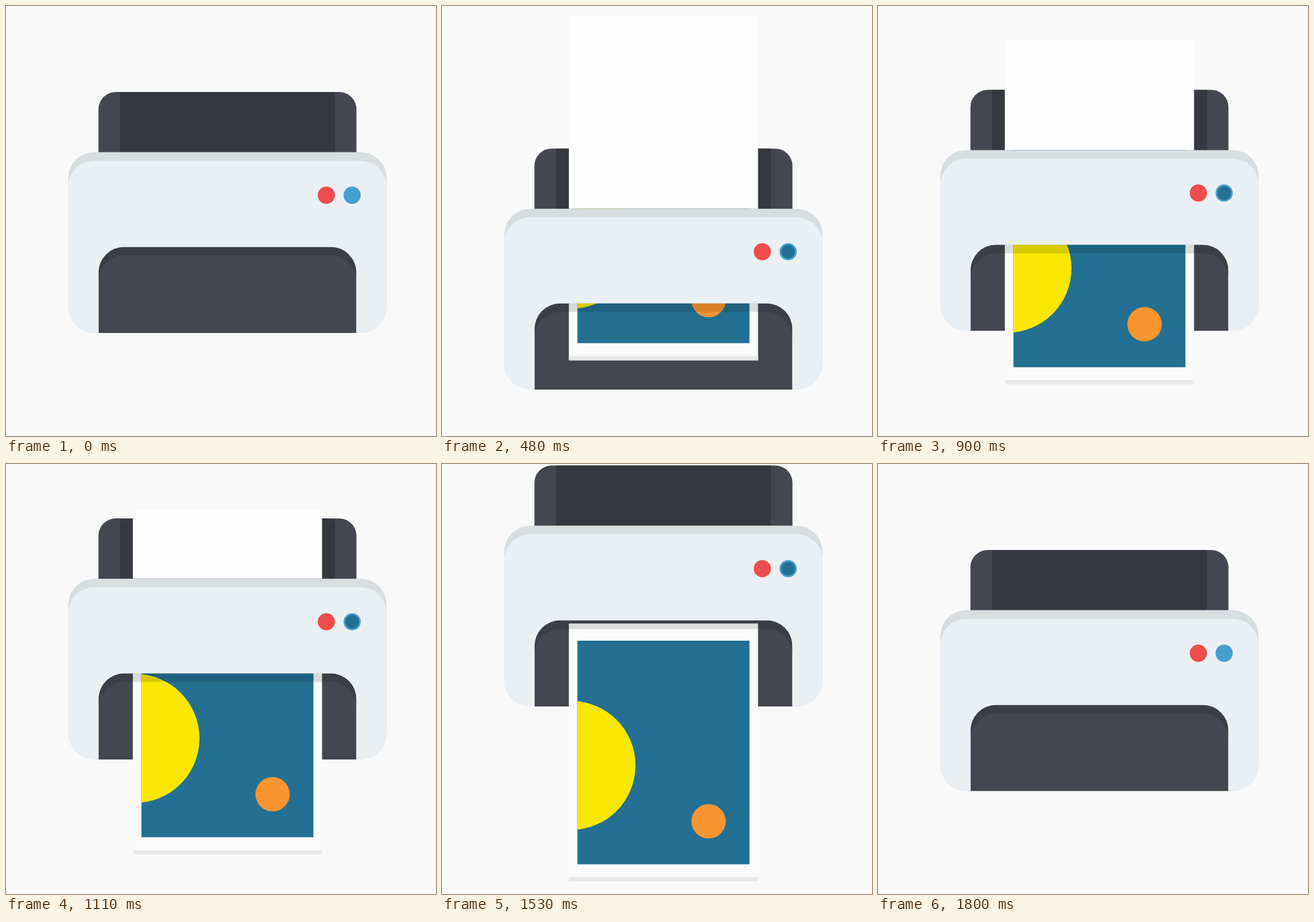
Recreate the animation shown at these times as an HTML page with a canvas. Size 640 by 640 pixels, loop 1.83 s.

```html
<!DOCTYPE html>
<html>
<head>
<meta charset="utf-8">
<title>Printer</title>
<style>
html, body { margin: 0; width: 100%; height: 100%; overflow: hidden; background: #f9f9f9; }
canvas { display: block; }
</style>
</head>
<body>
<canvas id="stage" width="640" height="640"></canvas>
<script>
const ctx = document.getElementById('stage').getContext('2d');
const UNIT = 12.8, LOOP = 1830, STEP = 30;

// cubic-bezier(.42, 0, 1, 1), solved by bisection
function easeIn(x) {
  let lo = 0, hi = 1;
  for (let i = 0; i < 24; i++) {
    const s = (lo + hi) / 2;
    if (1.26 * s * (1 - s) ** 2 + 3 * s * s - 2 * s ** 3 < x) lo = s; else hi = s;
  }
  return 3 * lo * lo - 2 * lo ** 3;
}
const easeOut = x => 1 - easeIn(1 - x);
const mix = (a, b, k) => a + (b - a) * k;

// Enter with ease-out, print at a steady pace, leave with ease-in
function track(t, start, enter, leave, end) {
  if (t < 300) return mix(start, enter, easeOut(t / 300));
  if (t < 1500) return mix(enter, leave, (t - 300) / 1200);
  return mix(leave, end, easeIn(Math.min(1, (t - 1500) / 300)));
}

function box(color, x, y, w, h) {
  ctx.fillStyle = color;
  ctx.fillRect(x, y, w, h);
}

function disc(color, x, y, r) {
  ctx.fillStyle = color;
  ctx.beginPath();
  ctx.arc(x, y, r, 0, 7);
  ctx.fill();
}

function clipped(x, y, w, h, draw) {
  ctx.save();
  ctx.beginPath();
  ctx.rect(x, y, w, h);
  ctx.clip();
  draw();
  ctx.restore();
}

function rounded(color, ...shapes) {
  ctx.fillStyle = color;
  ctx.beginPath();
  for (const s of shapes) ctx.roundRect(...s);
  ctx.fill('evenodd');
}

function print(bottom) {
  const top = bottom - 28;
  box('#fafafa', 14.75, top - 2, 22, 30);
  box('#e9e9e9', 14.75, bottom - 0.5, 22, 0.5);
  box('#237092', 15.75, top, 20, 26);
  clipped(15.75, top, 20, 26, () => disc('#f9e700', 15, top + 14.5, 7.5));
  disc('#fa942f', 31, top + 21, 2);
}

function draw(t) {
  const y = track(t, 0, 9.5, -10, 0);
  const paper = track(t, 8, 40, 48, 80);
  const lit = track(t, 0, 1, 1, 0);
  const bodyTop = y + 17, slotTop = y + 28;
  const slot = [10.75, slotTop, 30, 10, [3, 3, 0, 0]];

  ctx.setTransform(UNIT, 0, 0, UNIT, 0, 0);
  box('#f9f9f9', 0, 0, 50, 50);

  rounded('#444751', [10.75, y + 10, 30, 10, [2, 2, 0, 0]]);
  box('#363841', 13.25, y + 10, 25, 10);
  clipped(0, 0, 50, bodyTop, () => box('#fefefe', 14.75, paper - 40, 22, 30));

  box('#444751', 10.75, slotTop, 30, 10);
  box('#3e404a', 10.75, slotTop + 9.85, 30, 0.15);
  clipped(0, bodyTop, 50, 60, () => print(paper));

  rounded('#d8dde0', [7.25, bodyTop, 37, 21, 3], slot);
  rounded('#eaeff4', [7.25, bodyTop + 1, 37, 20, 3], slot);
  rounded('rgba(0,0,0,.13)', slot, [10.75, slotTop + 1, 30, 9, [3, 3, 0, 0]]);

  disc('#ef4d4d', 37.25, y + 22, 1);
  disc('#469fcd', 40.25, y + 22, 1);
  ctx.globalAlpha = lit;
  disc('#237092', 40.25, y + 22, 0.8);
  ctx.globalAlpha = 1;
}

const begin = performance.now();
function tick() {
  const t = (performance.now() - begin) % LOOP;
  draw(Math.floor(t / STEP) * STEP);
  requestAnimationFrame(tick);
}
tick();
</script>
</body>
</html>
```
